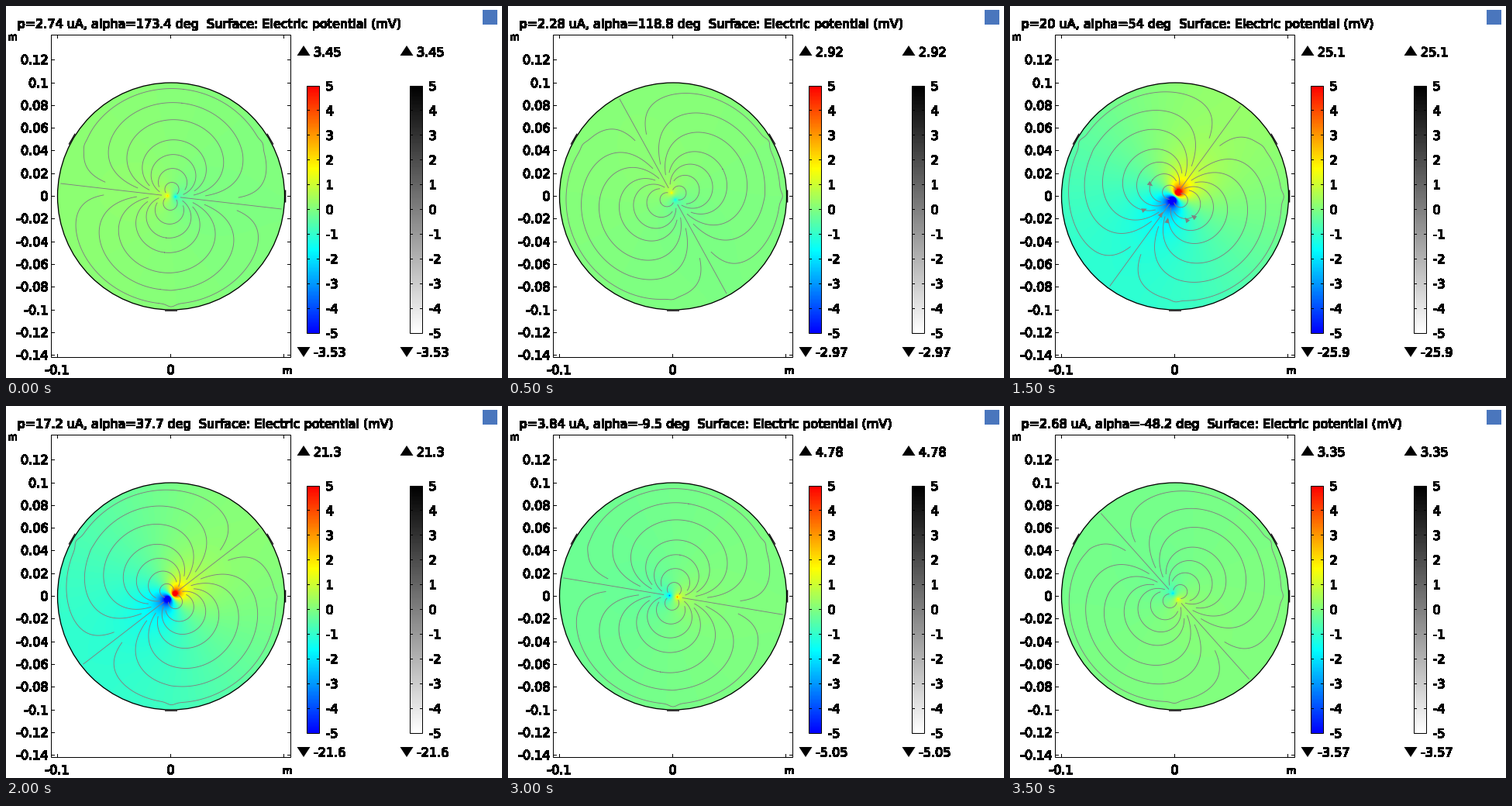
A matplotlib script that plays this animation: 640x480 px, repeating every 4 s.

```python
import numpy as np
import matplotlib.pyplot as plt
from matplotlib.animation import FuncAnimation
from matplotlib.colors import LinearSegmentedColormap
from matplotlib.collections import LineCollection, PolyCollection
from matplotlib.patches import Circle, Polygon, Rectangle
from matplotlib.patheffects import withStroke

W, H, DPI = 640, 480, 100
PX = 72 / DPI
CX, CY, R = 213, 245.5, 146.5
HALF_GAP = 5          # half the distance between the two poles, px
GROUND = complex(R, 0)
RAINBOW = LinearSegmentedColormap.from_list(
    "rainbow", [(0, 0, 1), (0, 1, 1), (1, 1, 0), (1, 0, 0)])

# dipole moment, angle, highest and lowest potential
STATES = [
    (2.74, 173.4, "3.45", "-3.53"),
    (2.28, 118.8, "2.92", "-2.97"),
    (3.72, 81.9, "4.87", "-4.86"),
    (20, 54, "25.1", "-25.9"),
    (17.2, 37.7, "21.3", "-21.6"),
    (13.22, 12.4, "16.1", "-16.2"),
    (3.84, -9.5, "4.78", "-5.05"),
    (2.68, -48.2, "3.35", "-3.57"),
]
CROSSINGS = [99, 54, 18, 36, 73, 121, 139]   # radius where a line crosses the normal
ELECTRODES = np.radians([0, 30, 150, 270])
ARROWS = [(195, 269), (203, 277), (173, 263), (237, 272), (228, 276), (181, 230)]

plt.rcParams["font.family"] = "DejaVu Sans"
plt.rcParams["text.antialiased"] = False
fig = plt.figure(figsize=(W / DPI, H / DPI), dpi=DPI, facecolor="white")
ax = fig.add_axes([0, 0, 1, 1])
ax.set_xlim(0, W)
ax.set_ylim(H, 0)
ax.axis("off")


def label(x, y, s, size=16, ha="left"):
    """Text with its cap height centred on y."""
    return ax.text(x, y + 0.37 * size, s, fontsize=size * PX, ha=ha, va="baseline",
                   color="black", zorder=6,
                   path_effects=[withStroke(linewidth=0.5 * PX, foreground="black")])


def line(xs, ys, color="black", width=1):
    ax.plot(xs, ys, color=color, lw=width * PX, snap=False, zorder=5,
            solid_capstyle="butt")


def frame(x, y, w, h):
    ax.add_patch(Rectangle((x + 0.5, y + 0.5), w, h, fill=False, ec="black",
                           lw=PX, snap=False, zorder=5))


def mid(v):
    """Middle of the pixel that holds v."""
    return np.floor(v) + 0.5


def to_px(z):
    return np.column_stack([CX + z.real, CY - z.imag])


def potential(z, p, angle):
    """Two opposite poles in an insulated disc, zero at the ground electrode."""
    k = 0.25 * p
    a = HALF_GAP * np.exp(1j * np.radians(angle))

    def raw(q):
        near = np.log((np.abs(q + a) + 1e-3) / (np.abs(q - a) + 1e-3))
        wall = np.log(np.abs(R**2 + q * np.conj(a)) / np.abs(R**2 - q * np.conj(a)))
        return k * (near + wall)

    return raw(z) - raw(GROUND)


def half_line(cross, end, side):
    """Field line from its crossing of the normal to one end of the axis."""
    c = 1 / cross - cross / R**2
    t = np.pi / 2 * (1 - np.linspace(0, 0.995, 420))**2
    s = c / np.maximum(np.sin(t), 1e-9)
    r = R**2 / 2 * (np.sqrt(s**2 + 4 / R**2) - s)
    keep = r > 8
    r, t = r[keep], t[keep]
    return r * (end * np.cos(t) + 1j * side * np.sin(t))


def bulge(z):
    """Pull the outermost lines towards the electrodes."""
    d = np.angle(np.exp(1j * (np.angle(z)[:, None] - ELECTRODES)))
    bump = np.exp(-(d / 0.05)**2).sum(axis=1)
    return z * (1 + 0.028 * bump * (np.abs(z) / 140)**12)


def trim(z, placed):
    """Cut a line where it comes too close to those already there."""
    gap = np.abs(z[:, None] - placed[None, :]).min(axis=1)
    close = np.flatnonzero(gap < 3 + 0.06 * np.abs(z))
    return z[:close[0]] if close.size else z


def streamlines(angle):
    tilt = (angle + 90) % 180 - 90
    turn = np.exp(1j * np.radians(tilt))
    spoke = np.linspace(12, R - 3, 90)
    lines = [spoke + 0j, -spoke + 0j]
    placed = np.concatenate(lines)
    for cross in CROSSINGS:
        fresh = []
        for side in (1, -1):
            parts = [trim(half_line(cross, end, side), placed) for end in (-1, 1)]
            fresh.append(np.concatenate([parts[0][::-1], parts[1]]))
        lines += fresh
        placed = np.concatenate([placed, *fresh])
    return [to_px(bulge(z * turn)) for z in lines if z.size > 1]


def arrowheads():
    heads = []
    sink = complex(208 - CX, CY - 250)
    for x, y in ARROWS:
        z = complex(x - CX, CY - y)
        u = (sink - z) / abs(sink - z)
        heads.append(to_px(z + u * np.array([4, -3 + 3j, -3 - 3j])))
    return heads


def draw_axes():
    frame(58, 37, 309, 416)
    for i in range(-7, 7):
        y = mid(CY - 29.3 * i)
        line([58, 63], [y, y])
        line([363, 368], [y, y])
        label(54.5, y - 0.5, f"{i * 0.02:.2f}".rstrip("0").rstrip(".") if i else "0",
              ha="right")
    for x in (66.5, 212.5, 358.5):
        line([x, x], [449, 454])
        line([x, x], [37, 42])
    label(66, 469, "-0.1", ha="center")
    label(212.5, 469, "0", ha="center")
    label(357, 470, "m", 12.5)
    label(2.5, 39.5, "m", 12.5)


def draw_bar(x, cmap):
    """Colour bar; returns the texts for its highest and lowest value."""
    ramp = np.linspace(1, 0, 320)[:, None]
    ax.imshow(ramp, cmap=cmap, extent=(x, x + 15, 422, 103), aspect="auto",
              vmin=0, vmax=1, zorder=3)
    frame(x - 1, 103, 16, 319)
    for v in range(-5, 6):
        y = 262.5 - 31.9 * v
        line([x, x + 3], [mid(y)] * 2)
        line([x + 12, x + 15], [mid(y)] * 2)
        label(x + 23.5, y, str(v))
    for y, d in ((58, 1), (446, -1)):
        ax.add_patch(Polygon([(x - 5, y - 7 * d), (x - 13.5, y + 6 * d),
                              (x + 3.5, y + 6 * d)], color="black", lw=0, zorder=5))
    return label(x + 8, 59, ""), label(x + 8, 446.5, "")


def draw_disc_edge():
    ax.add_patch(Circle((CX, CY), R, fill=False, ec="black", lw=1.3 * PX, zorder=4))
    for a in ELECTRODES:
        chord = to_px((R + 1.2 + 1j * np.array([-8, 8])) * np.exp(1j * a))
        line(chord[:, 0], chord[:, 1], width=1.2)


draw_axes()
draw_disc_edge()
bars = [draw_bar(389, RAINBOW), draw_bar(522, "gray_r")]
ax.add_patch(Rectangle((615, 5), 19, 19, color="#4a76bd", lw=0, zorder=5))

# one sample per pixel over the square around the disc
half = 148.5
step = np.arange(-half, half) + 0.5
grid = step[None, :] - 1j * step[:, None]
surface = ax.imshow(np.zeros(grid.shape), cmap=RAINBOW, vmin=-5, vmax=5, aspect="auto",
                    extent=(CX - half, CX + half, CY + half, CY - half), zorder=1)
surface.set_clip_path(Circle((CX, CY), R, transform=ax.transData))
flow = ax.add_collection(LineCollection([], colors="#808080", linewidths=0.9 * PX,
                                        zorder=2))
heads = ax.add_collection(PolyCollection(arrowheads(), facecolors="#808080",
                                         linewidths=0, zorder=2))
title = label(14.5, 22.5, "")
ax.set_xlim(0, W)
ax.set_ylim(H, 0)


def update(i):
    p, angle, high, low = STATES[i]
    title.set_text(f"p={p:g} uA, alpha={angle:g} deg  Surface: Electric potential (mV)")
    for top, bottom in bars:
        top.set_text(high)
        bottom.set_text(low)
    surface.set_data(potential(grid, p, angle))
    flow.set_segments(streamlines(angle))
    heads.set_visible(p >= 20)
    return []


anim = FuncAnimation(fig, update, frames=len(STATES), interval=500,
                     init_func=lambda: [], repeat=True, repeat_delay=0, blit=False)
plt.show()
```
